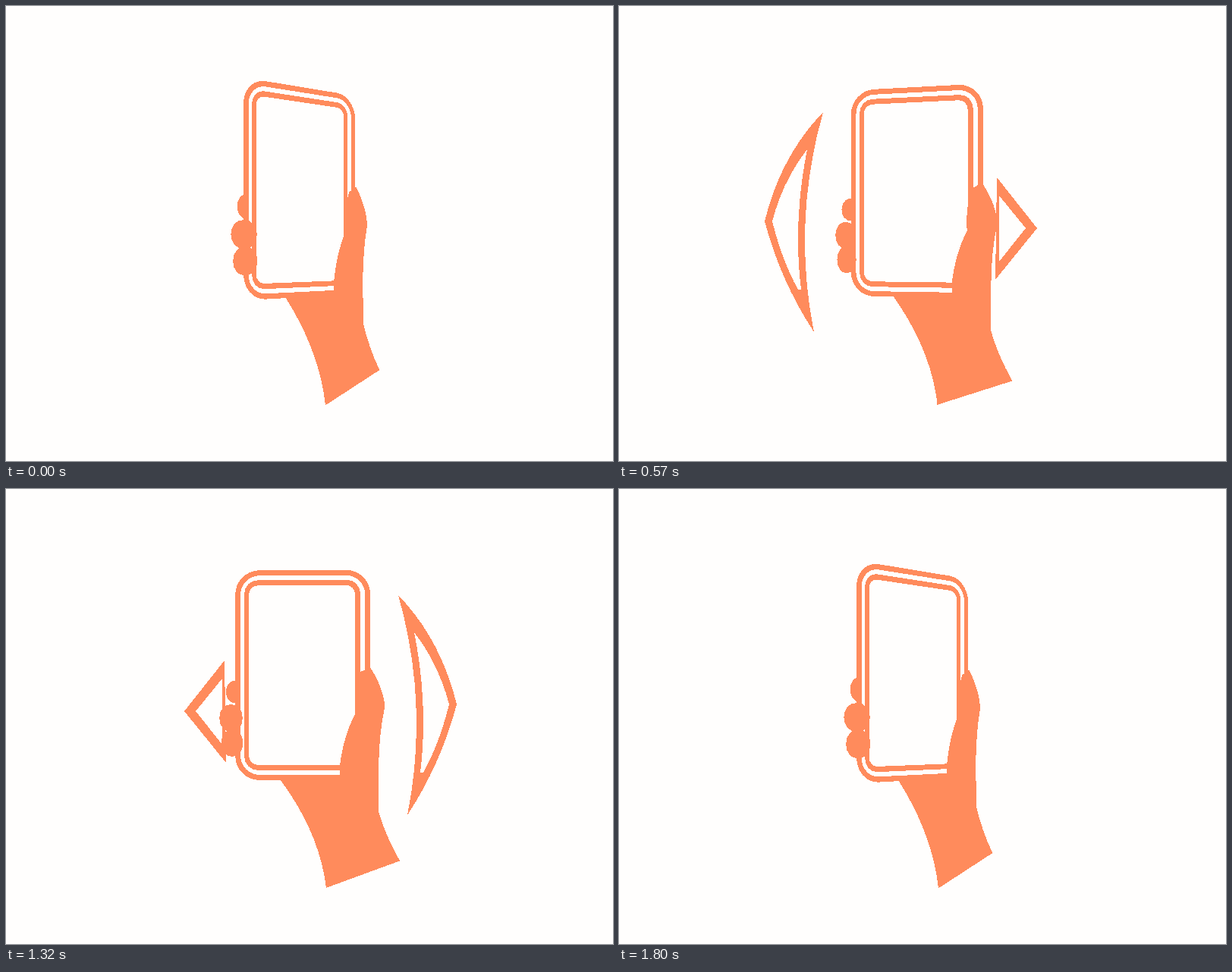
Animation, 800 px wide and 600 px high, one loop 1.83 s. Source, as an HTML page:

```html
<!DOCTYPE html>
<html lang="en">
<head>
<meta charset="utf-8">
<title>Turning phone</title>
<style>
html, body { margin: 0; width: 100%; height: 100%; overflow: hidden; background: #fffefd; }
svg { display: block; fill: #ff8b5c; fill-rule: evenodd; shape-rendering: crispEdges; }
#body { fill: #fffefd; }
#fingers { fill-rule: nonzero; }
</style>
</head>
<body>
<svg width="800" height="600" viewBox="0 0 800 600">
  <path id="big"/>
  <path id="small"/>
  <path id="body"/>
  <path id="fingers"/>
  <path id="rings"/>
  <path id="hand"/>
</svg>
<script>
const LOOP = 1830, STEP = 30;
const AXIS = 390, HORIZON = 315, DEPTH = 870, MIRROR = 786;

const PAIR = /(-?[\d.]+),(-?[\d.]+)/g;
const lerp = (a, b, u) => a + (b - a) * u;
const smooth = u => u * u * (3 - 2 * u);

// Path text of absolute "x,y" pairs, each pair sent through a mapping
const warp = (d, map) => d.replace(PAIR, (_, x, y) =>
  map(+x, +y).map(v => v.toFixed(2)).join(','));

const show = (id, d) => document.getElementById(id).setAttribute('d', d);

function roundRect(l, t, r, b, rad) {
  const k = rad * 0.45;
  return `M${l + rad},${t} L${r - rad},${t} C${r - k},${t} ${r},${t + k} ${r},${t + rad}
    L${r},${b - rad} C${r},${b - k} ${r - k},${b} ${r - rad},${b}
    L${l + rad},${b} C${l + k},${b} ${l},${b - k} ${l},${b - rad}
    L${l},${t + rad} C${l},${t + k} ${l + k},${t} ${l + rad},${t} Z `;
}

function oval(x, y, rx, ry) {
  const a = rx * 0.6, b = ry * 0.6;
  return `M${x - rx},${y} C${x - rx},${y - b} ${x - a},${y - ry} ${x},${y - ry}
    C${x + a},${y - ry} ${x + rx},${y - b} ${x + rx},${y}
    C${x + rx},${y + b} ${x + a},${y + ry} ${x},${y + ry}
    C${x - a},${y + ry} ${x - rx},${y + b} ${x - rx},${y} Z `;
}

const body = roundRect(302, 107, 480, 384, 32);
const rings = body + roundRect(309, 114, 473, 377, 25)
  + roundRect(314, 120, 467, 371, 18) + roundRect(320, 127, 460, 364, 12);
const topFinger = 'M304,252 C285,252 285,283 304,283 Z ';
const lowFingers = oval(296.5, 302, 15.5, 18) + oval(298, 335, 14.5, 18);
const hand = `M479,234 C490,250 499,272 499,288 C494,310 491,340 491,370
  L491,425 Q500,457 519,490 L422,526 Q414,455 362,384 L362,380 L440,380 L440,365
  Q445,325 460,297 Q458,262 467,241 Q472,240 479,234 Z`;

// Arrow outline and hole at the three stops of its travel
const STOPS = [0, 22, 37];
const big = [
  `M300,129 Q236,185 208,281 Q234,372 288,441 Q252,285 300,129 Z
   M278,173 Q241,218 218,281 Q235,336 263,386 L269,386 Q254,280 278,173 Z`,
  `M269,140 Q213,198 192,284 Q213,363 257,430 Q228,285 269,140 Z
   M248,189 Q216,230 202,284 Q215,336 236,374 L240,374 Q229,285 248,189 Z`,
  `M250,150 Q202,205 183,285 Q203,358 239,418 Q213,285 250,150 Z
   M235,193 Q204,232 190,285 Q202,335 223,373 L227,373 Q216,285 235,193 Z`
];
const small = [
  'M480,229 L529,294 L482,358 Z M486,252 L518,294 L486,341 Z',
  'M498,226 L551,293 L496,361 Z M501,250 L536,293 L501,337 Z',
  'M510,227 L566,293 L509,360 Z M515,250 L552,293 L515,337 Z'
];

function pose(keys, s) {
  const i = s < STOPS[1] ? 0 : 1;
  const u = (s - STOPS[i]) / (STOPS[i + 1] - STOPS[i]);
  const next = keys[i + 1].matchAll(PAIR);
  return warp(keys[i], (x, y) => {
    const [, nx, ny] = next.next().value;
    return [lerp(x, +nx, u), lerp(y, +ny, u)];
  });
}

// [time, travel]; arrows are hidden outside each table
const leftSwing = [[255, -14], [300, 0], [420, 30], [510, 43], [540, 43], [570, 22], [600, 0], [610, -6]];
const rightSwing = [[1240, -14], [1320, 22], [1440, 36], [1530, 43], [1560, 37], [1590, 18], [1620, -4], [1630, -10]];

function travel(table, t) {
  const i = table.findIndex(k => t < k[0]);
  if (i < 1) return null;
  const [t0, a] = table[i - 1], [t1, b] = table[i];
  return lerp(a, b, (t - t0) / (t1 - t0));
}

function turnAt(t) {
  const u = t < 890 ? smooth(t / 890) : 1 - smooth(Math.min(1, (t - 890) / 900));
  return lerp(34.5, -32, u) * Math.PI / 180;
}

function projector(angle) {
  const c = Math.cos(angle), s = Math.sin(angle);
  return (x, y, lift = 0) => {
    const dx = x - AXIS, k = DEPTH / (DEPTH + dx * s);
    return [AXIS + (dx * c + lift * s) * k, HORIZON + (y - HORIZON) * k];
  };
}

function drawArrows(t) {
  const right = t > LOOP / 2;
  const s = travel(right ? rightSwing : leftSwing, t);
  const place = (x, y) => [right ? MIRROR - x : x, y];
  show('big', s === null ? '' : warp(pose(big, s), place));
  show('small', s === null ? '' : warp(pose(small, s), place));
}

function draw(t) {
  const angle = turnAt(t), project = projector(angle), sway = 0.06 * Math.sin(angle);
  const flat = (x, y) => project(x, y);
  drawArrows(t);
  show('body', warp(body, flat));
  show('fingers', warp(topFinger, (x, y) => project(x, y, 5))
    + warp(lowFingers, (x, y) => project(x, y, 5 + (x - 281) * 0.3)));
  show('rings', warp(rings, flat));
  show('hand', warp(hand, (x, y) => {
    const [px, py] = project(x, y, 4), drift = Math.max(0, y - 384) * sway;
    return [px + drift * 0.6, py + drift];
  }));
}

const start = performance.now();
function tick() {
  const t = Math.max(0, performance.now() - start) % LOOP;
  draw(Math.floor(t / STEP) * STEP);
  requestAnimationFrame(tick);
}
tick();
</script>
</body>
</html>
```
